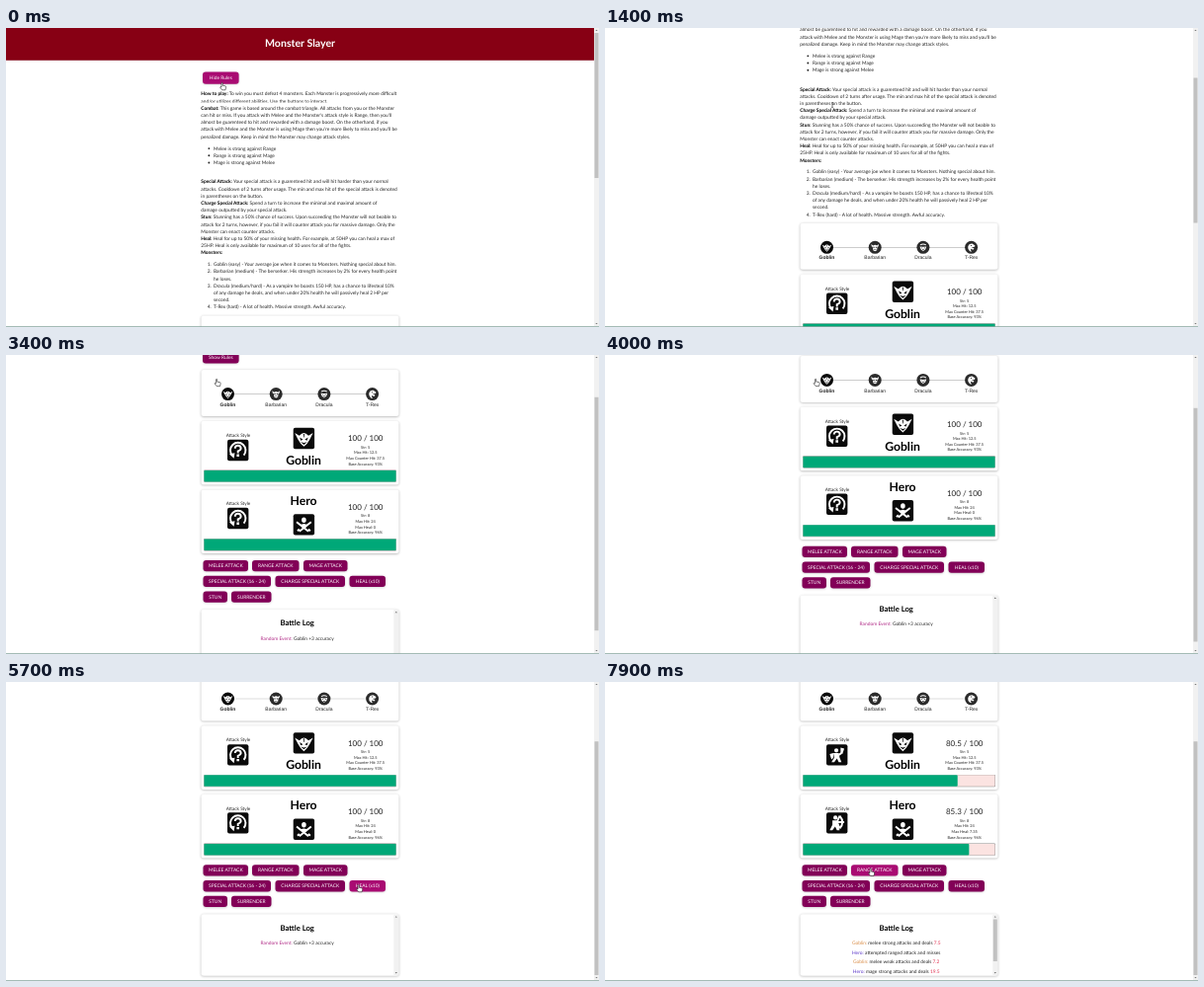
An HTML page with a canvas that plays this animation: 600x303 px, repeating every 8 s.

```html
<!DOCTYPE html>
<html lang="en">
<head>
<meta charset="utf-8">
<title>Monster Slayer</title>
<style>
  html, body { margin: 0; height: 100%; overflow: hidden; background: #fff; }
  canvas { display: block; width: 600px; height: 303px; }
</style>
</head>
<body>
<canvas id="stage" width="600" height="303"></canvas>
<script>
const ctx = document.getElementById('stage').getContext('2d');
ctx.textRendering = 'geometricPrecision';

const LOOP = 8000, MAX_SCROLL = 70.9, RULES_HEIGHT = 228.2;
const COLLAPSE = 2500, MAGE_CLICK = 6800, RANGE_CLICK = 7600;
const INK = '#222', SANS = 'Lato, sans-serif', BODY = 4.87;

// Keyframes: time followed by values.
const SCROLL = [[0, 0], [400, 0], [1300, 93.75], [1550, 93.75], [2100, 31.25],
  [2950, 31.25], [3800, 62.5], [4100, 62.5], [4650, MAX_SCROLL]];
const CURSOR = [[0, 218, 55.3], [100, 218, 55.3], [200, 230, 48.5], [400, 230, 48.5],
  [1000, 230, 76], [1500, 230, 76], [2150, 212.5, 24.3], [4750, 212.5, 24],
  [5200, 222, 150], [5600, 372, 207], [6100, 222, 191], [6550, 318, 190],
  [6950, 318, 190], [7400, 268, 189]];

// Numbers are extra vertical gaps; "|" ends the bold part; tabs indent.
const RULES = [
  'How to play:| To win you must defeat 4 monsters. Each Monster is progressively more difficult',
  'and/or utilizes different abilities. Use the buttons to interact.',
  'Combat:| This game is based around the combat triangle. All attacks from you or the Monster',
  "can hit or miss. If you attack with Melee and the Monster's attack style is Range, then you'll",
  'almost be guarenteed to hit and rewarded with a damage boost. On the otherhand, if you',
  "attack with Melee and the Monster is using Mage then you're more likely to miss and you'll be",
  'penalized damage. Keep in mind the Monster may change attack styles.',
  4.8, '•\tMelee is strong against Range', '•\tRange is strong against Mage', '•\tMage is strong against Melee',
  12.4,
  'Special Attack:| Your special attack is a guarenteed hit and will hit harder than your normal',
  'attacks. Cooldown of 2 turns after usage. The min and max hit of the special attack is denoted',
  'in parentheses on the button.',
  'Charge Special Attack:| Spend a turn to increase the minimal and maximal amount of',
  'damage outputted by your special attack.',
  'Stun:| Stunning has a 50% chance of success. Upon succeeding the Monster will not beable to',
  'attack for 2 turns, however, if you fail it will counter attack you for massive damage. Only the',
  'Monster can enact counter attacks.',
  'Heal:| Heal for up to 50% of your missing health. For example, at 50HP you can heal a max of',
  '25HP. Heal is only available for maximum of 10 uses for all of the fights.',
  'Monsters:|',
  4.8, '1.\tGoblin (easy) - Your average joe when it comes to Monsters. Nothing special about him.',
  '2.\tBarbarian (medium) - The berserker. His strength increases by 2% for every health point',
  '\the loses.',
  '3.\tDracula (medium/hard) - As a vampire he boasts 150 HP, has a chance to lifesteal 10%',
  '\tof any damage he deals, and when under 20% health he will passively heal 2 HP per',
  '\tsecond.',
  '4.\tT-Rex (hard) - A lot of health. Massive strength. Awful accuracy.',
];

// x, y, width, label, in the fully scrolled layout
const BUTTONS = [
  [199.5, 185.3, 45.5, 'MELEE ATTACK'], [249, 185.3, 47.5, 'RANGE ATTACK'], [301, 185.3, 44.5, 'MAGE ATTACK'],
  [199.5, 201.1, 68.5, 'SPECIAL ATTACK (16 - 24)'], [272.5, 201.1, 70.5, 'CHARGE SPECIAL ATTACK'],
  [347.5, 201.1, 36.5, 'HEAL (x10)'], [199.5, 216.8, 24.5, 'STUN'], [228, 216.8, 40.5, 'SURRENDER'],
];

// Each icon lives in a 20 by 20 box: filled path, then stroked path.
const icon = (fill, line = '') => ({ fill: new Path2D(fill), line: new Path2D(line) });
const ICONS = {
  Goblin: icon('M0 4L5 7Q10 1 15 7L20 4L16.5 11Q14 16 10 19Q6 16 3.5 11ZM5.5 9L9 11.5L6.5 12.5ZM14.5 9L11 11.5L13.5 12.5ZM6.5 14L10 15L13.5 14L10 17ZM9.4 5H10.6L10.3 9H9.7Z'),
  Barbarian: icon('M3 8L2 3L6 6Q10 3 14 6L18 3L17 8L15 9L14 16L10 18L6 16L5 9ZM6 9H9V11H6ZM11 9H14V11H11ZM7 14H13V15H7Z'),
  Dracula: icon('M3 8L10 9L17 8L15 14L10 18L5 14ZM6 10L9 12H6ZM14 10L11 12H14ZM8 14H12L11 16H9Z', 'M4 5Q10 1 16 5'),
  'T-Rex': icon('M3 9Q4 2 12 2L18 6L17 9L10 10L16 12L14 15L9 13Q8 16 11 19L7 18Q2 14 3 9ZM9 5H11V7H9Z'),
  unknown: icon('M8.6 14.4H11.4V17H8.6ZM0.5 14L6.5 13L5.5 19Z', 'M3.6 15.5A8.4 8.4 0 1 1 16.4 15.5M6.8 8Q6.8 4.9 10 4.9Q13.2 4.9 13.2 8Q13.2 9.6 10 11V13.4'),
  Hero: icon('M7.5 5A2.5 3 0 1 1 12.5 5A2.5 3 0 1 1 7.5 5ZM6 10L10 9L14 10L12 13H8Z', 'M2 7L15 17.5M18 7L5 17.5M3 17L5 15M17 17L15 15'),
  melee: icon('M7 5A2.3 2.3 0 1 1 11.6 5A2.3 2.3 0 1 1 7 5ZM6 8H12L13 13L15 18H12L10 14L7 18H4L7 13ZM14 2L18 3L16 9L14 8ZM2 9L6 8V13L4 15Z', 'M12 10L15 8'),
  range: icon('M6 4A2.3 2.3 0 1 1 10.6 4A2.3 2.3 0 1 1 6 4ZM5 7H10L11 12L13 18H10L8 14L5 18H2L5 12Z', 'M9 9H18M13 2Q19 9 13 16M13 2L10 9L13 16'),
  mage: icon('M6 6L9 1L12 6ZM6 7H12L14 18H4Z', 'M11 10L16 8M16 4V18'),
};

const clamp = v => Math.min(1, Math.max(0, v));
const smooth = p => p * p * (3 - 2 * p);
const easeOut = p => 1 - (1 - clamp(p)) ** 2;

function at(keys, t) {
  const i = keys.findIndex(k => k[0] > t);
  if (i < 0) return keys[keys.length - 1].slice(1);
  const [a, b] = [keys[i - 1], keys[i]];
  const p = smooth((t - a[0]) / (b[0] - a[0]));
  return a.slice(1).map((v, n) => v + (b[n + 1] - v) * p);
}

function text(str, x, y, size, { align = 'left', weight = 400, color = INK, font = SANS } = {}) {
  ctx.font = `${weight} ${size}px ${font}`;
  ctx.textAlign = align;
  ctx.fillStyle = color;
  ctx.fillText(str, x, y + size * 0.3);
  return ctx.measureText(str).width;
}

const centered = (str, x, y, size, style) => text(str, x, y, size, { align: 'center', ...style });

function box(x, y, w, h, r, color, shadow = 0) {
  ctx.save();
  if (shadow) {
    ctx.shadowColor = `rgba(0,0,0,${shadow})`;
    ctx.shadowBlur = 2.5;
    ctx.shadowOffsetY = 0.6;
  }
  ctx.fillStyle = color;
  ctx.beginPath();
  ctx.roundRect(x, y, w, h, r);
  ctx.fill();
  ctx.restore();
}

const card = (y, h) => box(197.5, y, 200, h, 2.5, '#fff', 0.3);

function glyph(name, x, y, size) {
  ctx.save();
  ctx.translate(x, y);
  ctx.scale(size / 20, size / 20);
  ctx.fillStyle = ctx.strokeStyle = '#fff';
  ctx.lineWidth = 2.1;
  ctx.fill(ICONS[name].fill, 'evenodd');
  ctx.stroke(ICONS[name].line);
  ctx.restore();
}

function tile(name, x, y) {
  box(x, y, 21.4, 21.4, 2, '#0a0a0a');
  glyph(name, x + 1.5, y + 1.5, 18.4);
}

function button(x, y, w, h, label, pointer) {
  const [px, py] = pointer;
  const over = px >= x && px <= x + w && py >= y && py <= y + h;
  box(x, y, w, h, 3, over ? '#a90b72' : '#820057', 0.2);
  centered(label, x + w / 2, y + h / 2, 4.9, { color: '#fff' });
  return over;
}

function triangle(x, y, dir) {
  ctx.fillStyle = '#777';
  ctx.beginPath();
  ctx.moveTo(x - 1.2, y + 0.6 * dir);
  ctx.lineTo(x + 1.2, y + 0.6 * dir);
  ctx.lineTo(x, y - 0.8 * dir);
  ctx.fill();
}

function scrollbar(x, y, h, thumbY, thumbH) {
  box(x, y, 5, h, 0, '#f1f1f1');
  if (thumbH) box(x + 0.5, thumbY, 4, thumbH, 0, '#c1c1c1');
  triangle(x + 2.5, y + 2.5, 1);
  triangle(x + 2.5, y + h - 2.5, -1);
}

function drawRules(open) {
  ctx.save();
  ctx.beginPath();
  ctx.rect(190, 60, 220, RULES_HEIGHT * open);
  ctx.clip();
  let y = 67;
  for (const line of RULES) {
    if (typeof line === 'number') { y += line; continue; }
    if (line.includes('\t')) {
      const [marker, body] = line.split('\t');
      if (marker === '•') box(204.4, y - 0.9, 1.9, 1.9, 1, INK);
      else text(marker, 207.6, y, BODY, { align: 'right' });
      text(body, 210, y, BODY);
    } else {
      const [bold, body] = line.includes('|') ? line.split('|') : ['', line];
      const w = text(bold, 197.3, y, BODY, { weight: 700, color: '#000' });
      text(body, 197.3 + w, y, BODY);
    }
    y += 7.18;
  }
  ctx.restore();
}

function drawStepper() {
  card(-7.7, 47.2);
  box(224, 16.7, 146, 0.6, 0, '#bbb');
  ['Goblin', 'Barbarian', 'Dracula', 'T-Rex'].forEach((name, i) => {
    const x = 224.5 + i * 48.7;
    box(x - 6.5, 10.5, 13, 13, 6.5, i ? '#2b2b2b' : '#0a0a0a');
    glyph(name, x - 4.8, 12.2, 9.6);
    centered(name, x, 27.6, 5, { weight: i ? 400 : 700, font: 'Liberation Sans, sans-serif' });
  });
}

function drawFighter(y, name, hero, style, health, barHealth, stats) {
  card(y, 64.7);
  centered('Attack Style', 235, y + 14.6, 4.7);
  tile(style, 224, y + (hero ? 18.4 : 19));
  tile(name, 290.7, y + (hero ? 24.8 : 7));
  centered(name, 301, y + (hero ? 12 : 40.3), 12.2, { weight: 700, color: '#000' });
  centered(`${health} / 100`, 363.7, y + 18.2, 8);
  stats.forEach((s, i) => centered(s, 363.7, y + 26.8 + i * 5.6, 3.95));
  const barY = y + 49.7;
  box(200, barY, 195, 12.3, 1, '#8a8a8a');
  box(200.4, barY + 0.4, 194.2, 11.5, 0.8, '#fbe3e1');
  box(200.4, barY + 0.4, 194.2 * barHealth / 100, 11.5, 0.8, '#00a878');
}

function logLine(runs, y) {
  ctx.font = `400 ${BODY}px ${SANS}`;
  let x = 294.7 - ctx.measureText(runs.map(r => r[0]).join('')).width / 2;
  for (const [str, color] of runs) x += text(str, x, y, BODY, { color });
}

function drawLog(rounds) {
  const goblin = ['Goblin:', '#d98b45'], hero = ['Hero:', '#5b35c9'], red = '#e02b4b';
  const lines = [[['Random Event:', '#b02a86'], [' Goblin +3 accuracy', INK]]];
  if (rounds > 0) lines.unshift(
    [goblin, [' melee weak attacks and deals ', INK], ['7.2', red]],
    [hero, [' mage strong attacks and deals ', INK], ['19.5', red]]);
  if (rounds > 1) lines.unshift(
    [goblin, [' melee strong attacks and deals ', INK], ['7.5', red]],
    [hero, [' attempted ranged attack and misses', INK]]);
  card(235.2, 62.5);
  ctx.save();
  ctx.beginPath();
  ctx.rect(197.5, 235.2, 200, 62);
  ctx.clip();
  centered('Battle Log', 294.7, 249.3, 7.7, { weight: 700, color: '#000' });
  lines.forEach((runs, i) => logLine(runs, 264.6 + i * 9.6));
  scrollbar(392.3, 235.5, 61.7, 240.5, rounds > 1 ? 42.5 : 0);
  ctx.restore();
}

function outlined(path, x, y) {
  ctx.save();
  ctx.translate(x, y);
  ctx.fillStyle = '#fff';
  ctx.strokeStyle = '#222';
  ctx.lineWidth = 0.6;
  ctx.fill(path);
  ctx.stroke(path);
  ctx.restore();
}

const ARROW = new Path2D('M0 0V5.6L1.3 4.4L2.2 6.4L3 6L2.2 4.1H4Z');
const HAND = new Path2D('M0 0.5Q0.6 -0.3 1.2 0.5V3L4 3.5Q4.8 3.8 4.6 5L4 7.5H0.7L-1.5 4.7Q-1.3 3.8 0 4.6Z');
const IBEAM = new Path2D('M-0.8 -2.4H0.8M0 -2.4V2.4M-0.8 2.4H0.8');

function drawCursor(t, [x, y], over) {
  if (over || (t > 2900 && t < 4400)) outlined(HAND, x, y);
  else if (t > 600 && t < 1800) outlined(IBEAM, x, y + 2);
  else outlined(ARROW, x, y);
}

function draw(t) {
  const [scroll] = at(SCROLL, t);
  const pointer = at(CURSOR, t);
  const open = 1 - smooth(clamp((t - COLLAPSE) / 200));
  const rounds = (t >= MAGE_CLICK) + (t >= RANGE_CLICK);
  const hit1 = easeOut((t - MAGE_CLICK) / 500), hit2 = easeOut((t - RANGE_CLICK) / 500);

  box(0, 0, 600, 303, 0, '#fff');

  ctx.save();
  ctx.translate(0, -scroll);
  box(0, 0, 595, 32.8, 0, '#870014', 0.2);
  centered('Monster Slayer', 297.5, 16.3, 10.6, { weight: 700, color: '#fff' });
  const label = t < COLLAPSE ? 'Hide Rules' : 'Show Rules';
  let over = button(199, 44.5, 36.6, 12.2, label, [pointer[0], pointer[1] + scroll]);
  if (open > 0) drawRules(open);
  if (t < 400) box(197, 75.6, 201, 2.2, 0, '#fff');
  ctx.restore();

  const shift = MAX_SCROLL - scroll + RULES_HEIGHT * open;
  ctx.save();
  ctx.translate(0, shift);
  drawStepper();
  drawFighter(44.2, 'Goblin', false, rounds ? 'melee' : 'unknown', rounds ? 80.5 : 100,
    100 - 19.5 * hit1, ['Str: 5', 'Max Hit: 12.5', 'Max Counter Hit: 37.5', 'Base Accuracy: 93%']);
  drawFighter(113.8, 'Hero', true, ['unknown', 'mage', 'range'][rounds], [100, 92.8, 85.3][rounds],
    100 - 7.2 * hit1 - 7.5 * hit2,
    ['Str: 8', 'Max Hit: 24', `Max Heal: ${[0, 3.6, 7.35][rounds]}`, 'Base Accuracy: 96%']);
  for (const [x, y, w, name] of BUTTONS) {
    if (button(x, y, w, 11.3, name, [pointer[0], pointer[1] - shift])) over = true;
  }
  drawLog(rounds);
  ctx.restore();

  const perPixel = 292 / (303 + MAX_SCROLL + RULES_HEIGHT * open);
  scrollbar(595, 0, 302, 5 + scroll * perPixel, 303 * perPixel);
  box(0, 302.3, 600, 0.7, 0, '#86a59c');
  drawCursor(t, pointer, over);
}

function tick() {
  draw(performance.now() % LOOP);
  requestAnimationFrame(tick);
}
tick();
</script>
</body>
</html>
```
